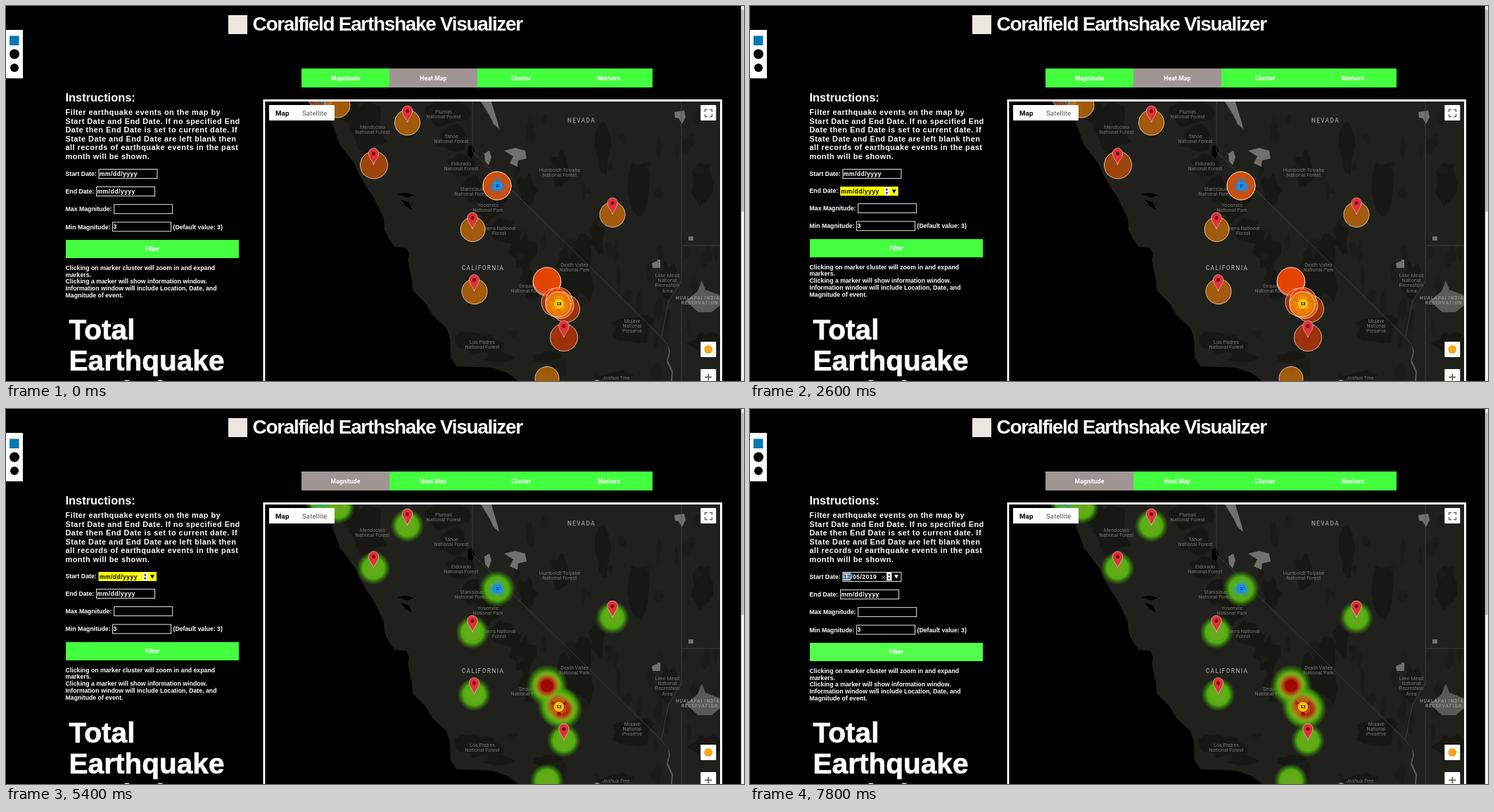
Animation of 1049 by 534 pixels, one loop 8000 ms. Source, as an HTML page:

```html
<!DOCTYPE html>
<html lang="en">
<head>
<meta charset="utf-8">
<title>Coralfield Earthshake Visualizer</title>
<style>
  html, body { margin: 0; width: 100%; height: 100%; overflow: hidden; background: #000; }
  svg { display: block; width: 1049px; height: 534px; }
  text { font: bold 8.74px "Liberation Sans", Arial, sans-serif; fill: #fff; white-space: pre; }
  .mid { text-anchor: middle; }
  .btn { font-family: Roboto, sans-serif; text-anchor: middle; }
  .intro { font-size: 10.93px; letter-spacing: .47px; }
  .place { font: 7.2px Roboto, sans-serif; fill: #767674; text-anchor: middle; }
  .state { font: 500 8.4px Roboto, sans-serif; fill: #989894; letter-spacing: 1.3px; text-anchor: middle; }
  .ctl { font: 9.83px Roboto, sans-serif; fill: #565656; }
  .big { font-size: 40.6px; stroke: #fff; stroke-width: .7px; }
  .cal { font-weight: normal; font-size: 7px; fill: #222; }
</style>
</head>
<body>
<svg id="stage" viewBox="0 0 1049 534">
  <defs>
    <clipPath id="view"><rect x="368.5" y="136" width="646.5" height="398"/></clipPath>
    <radialGradient id="green">
      <stop offset="0" stop-color="#6aa31c"/><stop offset=".4" stop-color="#62ac18"/>
      <stop offset=".64" stop-color="#55b90f" stop-opacity=".92"/>
      <stop offset=".82" stop-color="#48b404" stop-opacity=".42"/><stop offset="1" stop-color="#3fae00" stop-opacity="0"/>
    </radialGradient>
    <radialGradient id="ochre">
      <stop offset=".55" stop-color="#b0761a"/><stop offset=".8" stop-color="#8fa01c" stop-opacity=".75"/>
      <stop offset="1" stop-color="#6aa31c" stop-opacity="0"/>
    </radialGradient>
    <radialGradient id="red">
      <stop offset=".5" stop-color="#a00804"/><stop offset="1" stop-color="#b05a14" stop-opacity="0"/>
    </radialGradient>
  </defs>
  <rect width="1049" height="534"/>
  <rect x="316" y="13" width="27" height="27" fill="#ece7e0"/>
  <text x="350.5" y="35" style="font-size:28px;letter-spacing:-1.33px">Coralfield Earthshake Visualizer</text>
  <rect y="34" width="24" height="69" fill="#fff"/>
  <rect x="5" y="42.5" width="13.5" height="13.5" fill="#0077b5"/>
  <circle cx="12" cy="68.5" r="7"/><circle cx="12" cy="88" r="6"/>
  <g id="tabs"></g>
  <g id="copy"></g>
  <rect x="367" y="134.5" width="649.5" height="420" fill="#20201c" stroke="#fff" stroke-width="3"/>
  <g clip-path="url(#view)">
    <g id="land"></g>
    <g id="magnitude"></g>
    <g id="heat"></g>
    <g id="markers"></g>
    <g id="controls"></g>
  </g>
  <g id="form"></g>
  <g id="tip">
    <rect x="521.5" y="108.5" width="205" height="26" rx="2" fill="#1c1c1c" stroke="#555"/>
    <text class="mid" x="624" y="124.5" style="font-weight:normal">Toggle the magnitude circles shown on the map</text>
  </g>
  <g id="popup">
    <rect x="130" y="247" width="148" height="102" rx="2" fill="#000" opacity=".25"/>
    <rect x="132" y="245" width="144" height="101" fill="#fff"/>
    <g id="calendar"></g>
  </g>
  <rect x="1044.8" width="4.2" height="534" fill="#f1f1f1"/>
  <rect x="1045.3" y="5" width="3.2" height="288" fill="#b5b5b5"/>
</svg>
<script>
const $ = id => document.getElementById(id);
const GREEN = '#43ff3f', HOVER = '#52ff4c', GREY = '#9f9694';

const text = (x, y, s, cls = '', style = '') => `<text x="${x}" y="${y}" class="${cls}" style="${style}">${s}</text>`;
const rect = (x, y, w, h, fill, more = '') => `<rect x="${x}" y="${y}" width="${w}" height="${h}" fill="${fill}" ${more}/>`;
const circle = (x, y, r, fill, more = '') => `<circle cx="${x}" cy="${y}" r="${r}" fill="${fill}" ${more}/>`;
const path = (d, fill, more = '') => `<path d="${d}" fill="${fill}" ${more}/>`;
const lines = (x, y, step, cls, s) => s.split('|').map((l, i) => text(x, y + i * step, l, cls)).join('');

let seed = 7;
const random = () => (seed = seed * 16807 % 2147483647) / 2147483647;
function blob(x, y, rx, ry, fill = '#171814') {
  let d = '';
  for (let i = 0; i < 14; i++) {
    const a = i / 14 * Math.PI * 2, k = .6 + random() * .6;
    d += `${i ? 'L' : 'M'}${(x + Math.cos(a) * rx * k).toFixed(1)} ${(y + Math.sin(a) * ry * k).toFixed(1)}`;
  }
  return path(d + 'Z', fill);
}

// ---- Page copy
$('copy').innerHTML =
  text(84.5, 136, 'Instructions:', '', 'font-size:16.4px') +
  lines(84.5, 154.9, 12.6, 'intro', 'Filter earthquake events on the map by|Start Date and End Date. If no specified End|Date then End Date is set to current date. If|State Date and End Date are left blank then|all records of earthquake events in the past|month will be shown.') +
  lines(89.5, 475, 43.8, 'big', 'Total|Earthquake|Statistics');

// ---- Base map
function land() {
  const forests = [
    [515, 175, 26, 38], [490, 152, 14, 18], [622, 152, 34, 20], [636, 190, 26, 20], [648, 228, 22, 17],
    [664, 262, 24, 18], [688, 286, 24, 22], [705, 322, 24, 20], [735, 352, 18, 30], [748, 398, 18, 26],
    [812, 375, 26, 52], [890, 460, 30, 22], [672, 480, 36, 18], [700, 500, 24, 8], [770, 500, 20, 8],
    [870, 528, 30, 10], [740, 262, 14, 22], [790, 232, 14, 34], [850, 200, 12, 36], [900, 260, 15, 40],
    [940, 390, 14, 26], [990, 250, 16, 34], [992, 480, 22, 20], [840, 330, 12, 24]
  ].map(b => blob(...b)).join('');
  let ridges = '';
  for (let i = 0; i < 45; i++) ridges += blob(720 + random() * 290, 140 + random() * 390, 3 + random() * 5, 5 + random() * 14, '#1b1b18');
  const sea = path('M368 136H446L462 163 470 185 474 197 497 227 502 240 515 262 522 272 531 290 537 303 538 318 546 334 552 343 569 345 573 353 571 362 574 376 577 390 578 405 596 423 606 440 626 459 631 474 632 500 640 513 690 515 712 522 728 534H368Z', '#000');
  const water = path('M556 268L568 266 580 269 571 273ZM562 276L573 280 577 290 568 285ZM657 200L663 197 666 207 662 217 656 212Z', '#000');
  const grey = path('M675 136H690L694 150 699 166 701 175 693 168 688 157ZM680 210L687 206 690 215 686 227 681 221ZM708 206L724 202 738 206 740 217 728 220 727 229 716 224 721 214ZM950 151L964 149 966 158 961 168 956 160 951 159ZM918 366L926 363V361H930V373H919ZM970 328H977V334H970Z', '#70706d') +
    path('M966 420L983 406 989 391 994 404 1015 412V426L1003 436H984ZM941 482L944 492 941 505 948 520 947 534H945L946 521 939 506 942 493Z', '#5a5a57');
  const borders = path('M663 136V207L930 470 940 482M960 136V392L942 420 936 448 932 470M960 341H1015M960 430V534', 'none', 'stroke="#494946" stroke-width=".7"');
  const places = [
    [622, 153, 'Plumas|National Forest'], [521, 174.5, 'Mendocino|National Forest'], [633, 187.5, 'Tahoe|National Forest'],
    [647, 227, 'Eldorado|National Forest'], [787, 236, 'Humboldt-Toiyabe|National Forest'], [662, 262.5, 'Stanislaus|National Forest'],
    [685, 286, 'Yosemite|National Park'], [701, 319, 'Sierra National|Forest'], [808, 371, 'Death Valley|National Park'],
    [742, 401, 'Sequoia|National Forest'], [940, 386, 'Lake Mead|National|Recreation|Area'], [890, 451, 'Mojave|National|Preserve'],
    [677, 481, 'Los Padres|National Forest'], [867, 532, 'Joshua Tree|National Park']
  ].map(([x, y, s]) => lines(x, y, 7.2, 'place', s)).join('');
  const reservation = 'font-size:6.4px;letter-spacing:1px;text-anchor:start';
  return forests + ridges + sea + water + grey + borders + places + circle(840, 536, 4, '#888') +
    text(818, 165.5, 'NEVADA', 'state') + text(678, 375.5, 'CALIFORNIA', 'state') +
    text(952, 418, 'HUALAPAI INDIAN', 'state', reservation) + text(960, 425, 'RESERVATION', 'state', reservation);
}
$('land').innerHTML = land();

// ---- Overlays
const pins = [[570.5, 166], [522.5, 226.5], [663, 318], [862, 297], [665.5, 406.5], [793, 472]];
const ORANGE = '#e87a05', RUST = '#e05806', HOT = '#ff4a00', BRICK = '#e03c05';

$('magnitude').innerHTML = [
  [447, 127, 19, RUST], [471, 141, 18, ORANGE], [570.5, 166, 18, ORANGE], [523, 226.5, 19.5, RUST],
  [698, 256, 20, HOT], [698, 256, 20, RUST], [663.5, 318, 17.5, ORANGE], [862, 297, 18, ORANGE],
  [666, 406.5, 18, ORANGE], [769, 530.5, 17, ORANGE], [793, 472, 19.5, BRICK], [769, 393, 20, HOT],
  [769, 391.5, 19.5, HOT], [796, 431, 19.5, BRICK], [781, 422, 20, BRICK], [786, 420, 19, HOT], [788, 426, 19, ORANGE], [785, 425, 18, ORANGE]
].map(([x, y, r, c]) => circle(x, y, r, c, 'fill-opacity=".65" stroke="#f4ddd0" stroke-width=".8"')).join('');

const glow = (x, y, r, id) => circle(x, y, r, `url(#${id})`);
const hot = [[769, 394], [785, 423], [790, 427]];
$('heat').innerHTML =
  [...pins, [448, 129], [472, 140], [769, 529]].map(([x, y]) => glow(x, y, 24, 'green')).join('') +
  glow(698, 256, 26, 'green') +
  [[30, 'green'], [21, 'ochre'], [16, 'red']].map(([r, id]) => hot.map(([x, y]) => glow(x, y, r, id)).join('')).join('');

function cluster(x, y, count, color) {
  const rings = [9, 11, 13].map((r, i) => circle(x, y, r, 'none',
    `stroke="${color}" stroke-width="1.1" opacity="${.65 - i * .18}" stroke-dasharray="${r * 1.6} ${r * .494}" transform="rotate(-136 ${x} ${y})"`)).join('');
  return rings + circle(x, y, 7.3, color) + text(x, y + 2.2, count, 'mid', 'font-size:6.2px;fill:#000');
}
const pin = ([x, y]) => `<g transform="translate(${x} ${y})">` +
  path('M0 0C-1-6-7.2-10-7.2-16.7A7.2 7.2 0 0 1 7.2-16.7C7.2-10 1-6 0 0Z', '#e0313a', 'stroke="#f3d0d0" stroke-width=".6"') +
  circle(0, -16.3, 2.6, '#7a0d12') + '</g>';
$('markers').innerHTML = cluster(448, 130, 2, '#1490f0') + cluster(698.5, 256, 2, '#1490f0') +
  cluster(786, 424, 13, '#f4c412') + pins.map(pin).join('');

$('controls').innerHTML =
  rect(374, 141, 93, 22, '#fff') + rect(412, 141, 55, 22, '#ebebeb', 'id="satellite"') +
  rect(411.7, 141, .6, 22, '#e6e6e6') +
  text(383, 155.5, 'Map', 'ctl', 'font-weight:bold;fill:#000') + text(421, 155.5, 'Satellite', 'ctl') +
  [141, 478, 517].map(y => rect(987.3, y, 22, 22, '#fff', 'rx="1"')).join('') +
  path('M993.5 151V147.5H997M1000 147.5H1003.5V151M1003.5 154V157.5H1000M997 157.5H993.5V154', 'none', 'stroke="#666" stroke-width="1.4"') +
  circle(998.3, 489, 6, '#f5a81c') +
  path('M993.5 528.5H1003M998.3 523.8V533.2', 'none', 'stroke="#666" stroke-width="1.8"');

// ---- Date picker contents: December 2019 starts on a Sunday
function calendar() {
  let s = rect(137, 271, 133, 12.5, '#f2f2f2') + text(139, 261, 'December 2019 ▾', 'cal', 'font-size:8.2px') +
    ['◂', '●', '▸'].map((c, i) => rect(231.5 + i * 13, 252, 12, 12, '#f5f5f5', 'stroke="#ccc" stroke-width=".6"') +
      text(237.5 + i * 13, 260.5, c, 'cal mid')).join('') +
    [...'SMTWTFS'].map((c, i) => text(146.5 + i * 19, 280, c, 'cal mid', 'fill:#777')).join('') +
    rect(213, 284, 19, 11, '#cfe0fa', 'id="day"');
  for (let i = 0; i < 35; i++)
    s += text(146.5 + i % 7 * 19, 292 + Math.floor(i / 7) * 11, i % 31 + 1, 'cal mid', i > 30 ? 'fill:#bbb' : '');
  return s;
}
$('calendar').innerHTML = calendar();

// ---- Filter form
const triangle = (x, y, r, dir, fill = '#111') =>
  path(`M${x - r} ${y - r * .8 * dir}H${x + r}L${x} ${y + r * dir}Z`, fill);

function field(x, y, value = '', { hover, focus } = {}) {
  const ink = hover ? '#000' : '#fff';
  let s = hover ? rect(x, y, 82.5, 13, '#ff0')
    : rect(x + .4, y + .4, 83, 13, '#000', 'stroke="#fff" stroke-width=".9"');
  if (hover || focus) {
    s += rect(x + 62.5, y + .8, 7.5, 11.6, '#eee') + triangle(x + 66.3, y + 4, 1.6, -1) +
      triangle(x + 66.3, y + 9.3, 1.6, 1) + triangle(x + 76.5, y + 6.7, 3, 1, ink);
  }
  const filled = value[0] === '1';
  if (filled) s += path(`M${x + 56} ${y + 5.5}l4.6 4.6m0-4.6l-4.6 4.6`, 'none', 'stroke="#5a7590" stroke-width="1.2"');
  if (focus) s += rect(x + 1, y + 1.4, filled ? 10.8 : 16.5, 10.8, '#adcbf2');
  const first = focus ? `<tspan fill="#26405e">${value.slice(0, 2)}</tspan>${value.slice(2)}` : value;
  return s + text(x + 1.2, y + 9.8, first, '', `letter-spacing:.38px;fill:${ink}`);
}

function form(t, on) {
  const start = on(5400, 7700), end = on(2600, 2900), empty = 'mm/dd/yyyy';
  const shift = start || end ? -1.1 : 0;
  return text(84.5, start ? 241.2 : 241.9, 'Start Date:') +
    field(131.5, 232, t >= 7600 ? '12/05/2019' : empty, { hover: start, focus: t >= 6100 }) +
    text(84.5, 267.1 + shift * .8, 'End Date:') + field(128.2, 257.2 + (start ? shift : 0), empty, { hover: end }) +
    `<g transform="translate(0 ${shift})">` +
    text(84.5, 292.3, 'Max Magnitude:') + field(153.3, 282.3) +
    text(84.5, 317.5, 'Min Magnitude:') + field(151.2, 307.5, '3') + text(237.5, 317.5, '(Default value: 3)') +
    rect(85, 333, 246, 26, t >= 7800 ? HOVER : GREEN) + text(208, 349, 'Filter', 'btn') +
    lines(84.5, 375.7, 9.84, '', 'Clicking on marker cluster will zoom in and expand|markers.|Clicking a marker will show information window.|Information window will include Location, Date, and|Magnitude of event.') + '</g>';
}

function tabs(t, on) {
  const colors = [
    t >= 3300 ? GREY : on(1200, 2300) || on(3000, 3300) ? HOVER : GREEN,
    t < 4800 ? GREY : on(4800, 4900) ? HOVER : GREEN, GREEN, GREEN];
  return ['Magnitude', 'Heat Map', 'Cluster', 'Markers'].map((name, i) =>
    rect(420 + i * 124.85, 89, 124.85, 27, colors[i], 'shape-rendering="crispEdges"') +
    text(482.5 + i * 124.85, 105.5, name, 'btn')).join('');
}

// ---- Timeline
const cache = {};
function update(id, html) {
  if (cache[id] !== html) $(id).innerHTML = cache[id] = html;
}
const show = (id, visible) => { $(id).style.display = visible ? '' : 'none'; };

function frame() {
  const t = performance.now() % 8000;
  const on = (a, b) => t >= a && t < b;
  update('tabs', tabs(t, on));
  update('form', form(t, on));
  show('magnitude', t < 3300);
  show('heat', t >= 4800);
  show('tip', on(1700, 2300));
  show('satellite', on(2500, 2600));
  show('popup', on(6200, 7600));
  $('popup').style.opacity = t < 6300 ? .5 : 1;
  show('calendar', t >= 6500);
  show('day', t >= 6900);
  requestAnimationFrame(frame);
}
frame();
</script>
</body>
</html>
```
